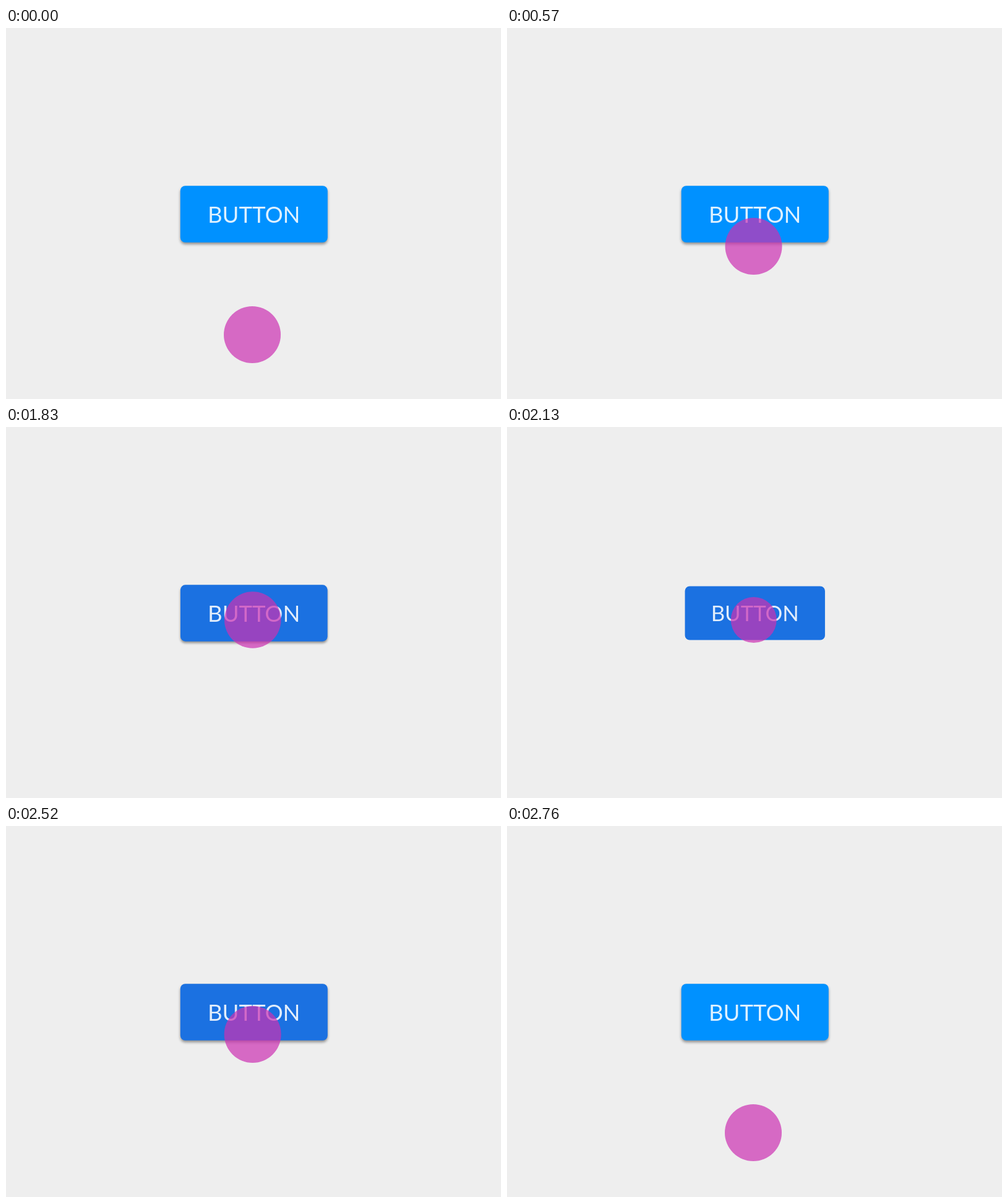
These frames come from a looping animation (800 px wide and 600 px high, 3030 ms). An HTML page with a canvas:

```html
<!DOCTYPE html>
<html lang="en">
<head>
<meta charset="utf-8">
<title>Button press</title>
<style>
  html, body { margin: 0; width: 100%; height: 100%; overflow: hidden; background: #eee; }
  canvas { display: block; }
</style>
</head>
<body>
<canvas width="800" height="600"></canvas>
<script>
const ctx = document.querySelector('canvas').getContext('2d');
const LOOP = 3030, STEP = 30;
const IDLE = [0, 145, 255], HOVER = [27, 113, 225];
const BUTTON = { x: 400.75, y: 301, w: 238, h: 91.5, r: 8 };

const mix = (a, b, k) => a + (b - a) * k;
const span = (t, from, to) => Math.min(1, Math.max(0, (t - from) / (to - from)));
const smooth = k => k * k * (3 - 2 * k);

function drawButton(hover, press) {
  const { x, y, w, h, r } = BUTTON;
  const scale = mix(1, 0.95, press), lift = 1 - press;
  ctx.save();
  ctx.translate(x, y);
  ctx.scale(scale, scale);

  ctx.save();
  ctx.shadowColor = `rgba(0, 0, 0, ${0.4 * lift})`;
  ctx.shadowOffsetY = 3 * lift;
  ctx.shadowBlur = 4 * lift;
  ctx.fillStyle = `rgb(${IDLE.map((c, i) => Math.round(mix(c, HOVER[i], hover)))})`;
  ctx.beginPath();
  ctx.roundRect(-w / 2, -h / 2, w, h, r);
  ctx.fill();
  ctx.restore();

  ctx.font = '36.5px Lato, sans-serif';
  ctx.textAlign = 'center';
  ctx.fillStyle = 'rgba(255, 255, 255, 0.87)';
  ctx.fillText('BUTTON', 0, 14);
  ctx.restore();
}

function drawPointer(near, press) {
  ctx.fillStyle = 'rgba(204, 49, 178, 0.7)';
  ctx.beginPath();
  ctx.arc(mix(398, 398.7, near), mix(496, 312, near), 46 * mix(1, 0.8, press), 0, 2 * Math.PI);
  ctx.fill();
}

function draw(t) {
  // The pointer arrives decelerating, taps, then leaves accelerating.
  const arrive = 1 - (1 - span(t, 420, 780)) ** 2.78;
  const leave = span(t, 2340, 2760) ** 2.36;
  const press = smooth(span(t, 1800, 2110)) - smooth(span(t, 2110, 2340));
  const hover = span(t, 600, 750) - span(t, 2580, 2730);

  ctx.fillStyle = '#eee';
  ctx.fillRect(0, 0, 800, 600);
  drawButton(hover, press);
  drawPointer(arrive - leave, press);
}

const start = performance.now();
function tick() {
  const t = (performance.now() - start) % LOOP;
  draw(Math.floor(t / STEP) * STEP);
  requestAnimationFrame(tick);
}
tick();
</script>
</body>
</html>
```
